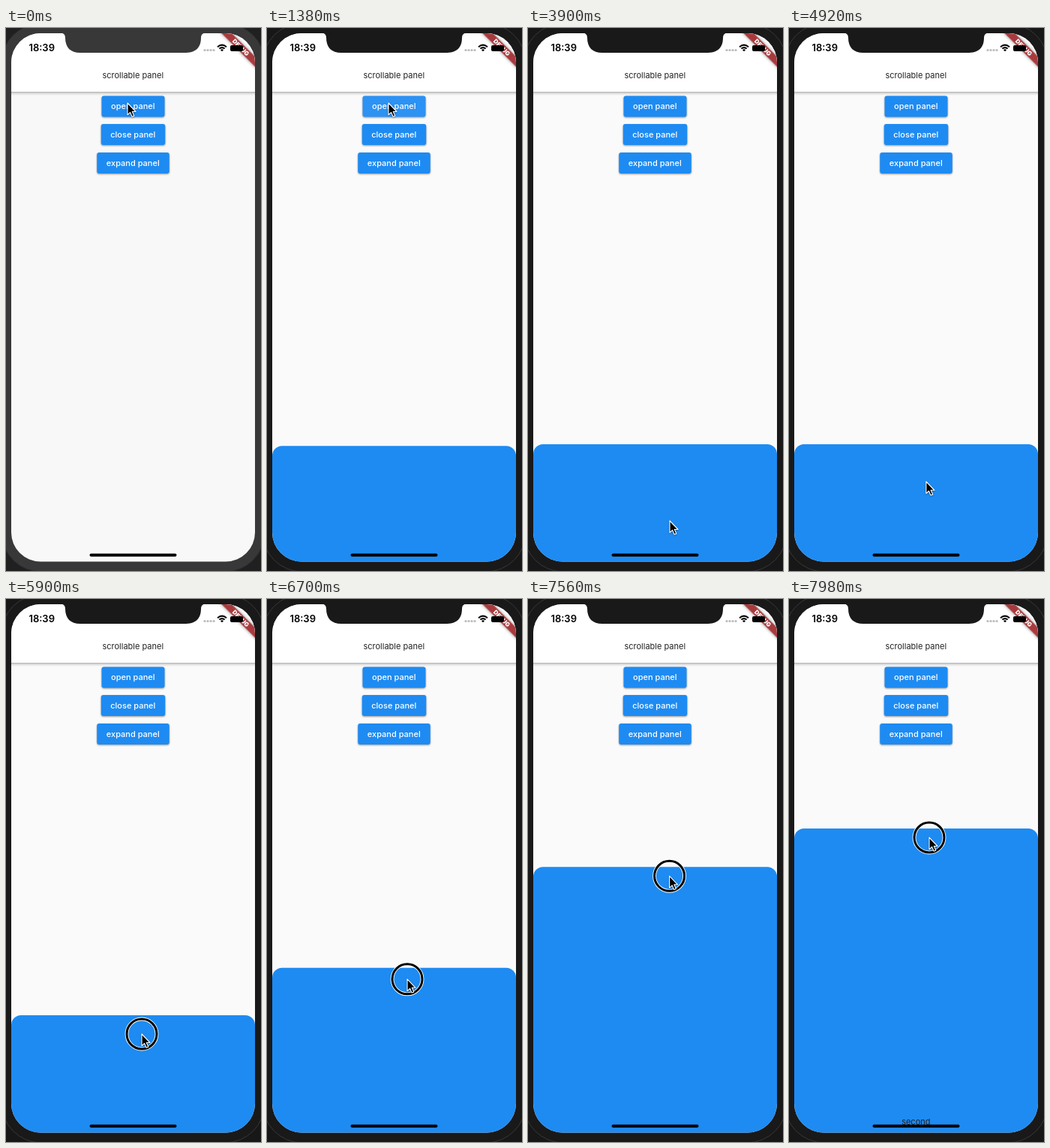
These frames come from a looping animation (340x724 px, 8 s). An HTML page:

```html
<!DOCTYPE html>
<html lang="en">
<head>
<meta charset="utf-8">
<title>Scrollable panel</title>
<style>
  html, body { margin: 0; width: 100%; height: 100%; overflow: hidden; background: #191919; }
  svg { display: block; width: 340px; height: 724px; }
  text { font: 11px Inter, "Open Sans", sans-serif; text-anchor: middle; fill: #222; }
  .button rect { fill: #1e8bf2; filter: drop-shadow(0 1.3px 1.3px #0006); }
  .button text { fill: #fff; font-weight: 500; }
  #clock { font-size: 13px; font-weight: 600; fill: #000; }
  #debug { font-size: 8px; font-weight: 900; fill: #fff; }
</style>
</head>
<body>
<svg viewBox="0 0 340 724">
  <defs>
    <clipPath id="screen"><rect x="7" y="7" width="325" height="704.5" rx="39"/></clipPath>
    <linearGradient id="barShadow" x2="0" y2="1">
      <stop stop-color="#000" stop-opacity=".3"/>
      <stop offset=".4" stop-color="#000" stop-opacity=".12"/>
      <stop offset="1" stop-color="#000" stop-opacity="0"/>
    </linearGradient>
  </defs>

  <rect id="outside" width="340" height="724"/>
  <rect id="bezel" x="-6" y="-6" width="351" height="731" rx="53"/>

  <g clip-path="url(#screen)">
    <rect id="page" x="7" y="7" width="325" height="705"/>
    <rect x="7" y="85" width="325" height="5" fill="url(#barShadow)"/>
    <rect x="7" y="7" width="325" height="78" fill="#fff"/>
    <text x="169.3" y="67">scrollable panel</text>
    <g id="buttons"></g>
    <rect id="ripple" x="127.5" y="90.5" width="84" height="28" rx="3" fill="#fff"/>

    <g id="panel">
      <rect x="7" width="325" height="740" rx="13" fill="#1e8bf2"/>
      <text x="169.3" y="394.5">second</text>
    </g>

    <g transform="translate(313.1 25.9) rotate(45)">
      <rect x="-36" y="-4.7" width="72" height="9.4" fill="#a83a3d" style="filter:drop-shadow(0 0 2px #0007)"/>
      <text id="debug" y="2.9">DEBUG</text>
    </g>

    <path d="M72 6 Q79 7 79 13 C79 26 86 33 99 33 H240 C253 33 260 26 260 13 Q260 7 267 6 Z" id="notch"/>
    <text id="clock" x="47.7" y="31">18:39</text>
    <g fill="#bbb">
      <circle cx="265" cy="29.5" r="1.6"/><circle cx="269" cy="29.5" r="1.6"/>
      <circle cx="273" cy="29.5" r="1.6"/><circle cx="277" cy="29.5" r="1.6"/>
    </g>
    <g fill="none" stroke="#000" stroke-width="2">
      <path d="M282 25.2 Q288 20 294 25.2"/>
      <path d="M284.4 27.6 Q288 24.6 291.6 27.6"/>
    </g>
    <path d="M286 29.2 Q288 27.5 290 29.2 L288 31.3 Z"/>
    <rect x="299" y="23" width="17" height="8" rx="2"/>
    <rect x="111.5" y="700.7" width="116" height="4" rx="2"/>
  </g>

  <g id="pointer">
    <g id="ring" fill="none">
      <circle r="20" stroke="#fff" stroke-width="4.8"/>
      <circle r="20" stroke="#000" stroke-width="3"/>
    </g>
    <path d="M0 0 V15.8 L3.6 12.5 L6.1 18.3 L8.8 17.2 L6.3 11.5 H11 Z"
          stroke="#fff" stroke-width="1.1" stroke-linejoin="round"
          style="filter:drop-shadow(0 1px .8px #0005)"/>
  </g>
</svg>
<script>
const LOOP = 8000, FOCUS = 860;
const $ = id => document.getElementById(id);

// [time, x, y] of the pointer tip
const pointerSteps = [
  [2700, 162, 100], [3260, 178, 182], [3500, 193, 400], [3780, 191, 645],
  [3900, 189, 657], [4460, 189, 657], [5060, 181, 589], [5320, 181, 588],
  [5600, 181, 580], [5920, 181, 580], [6300, 183, 556], [6700, 187, 507],
  [7160, 189, 417], [7440, 189, 384], [7720, 188, 350], [7980, 187, 318]
];
// [time, top edge] while the panel is dragged
const dragSteps = [
  [5980, 555], [6300, 540], [6700, 492], [7160, 404],
  [7440, 372], [7720, 338], [7980, 306]
];
const presses = [[860, 1040], [5400, LOOP]];

const clamp = v => Math.min(1, Math.max(0, v));
const easeOut = p => 1 - (1 - p) ** 3;

function at(steps, t) {
  const i = steps.findIndex(s => s[0] > t);
  if (i === 0) return steps[0].slice(1);
  if (i < 0) return steps[steps.length - 1].slice(1);
  const [a, b] = [steps[i - 1], steps[i]];
  const p = (t - a[0]) / (b[0] - a[0]);
  return a.slice(1).map((v, k) => v + (b[k + 1] - v) * p);
}

function panelTop(t) {
  if (t >= dragSteps[0][0]) return at(dragSteps, t)[0];
  return 713 - 158 * easeOut(clamp((t - 1040) / 450));
}

$("buttons").innerHTML = [["open", 84, 90.5], ["close", 85.5, 128], ["expand", 96.5, 166]]
  .map(([name, w, y]) => `<g class="button">
    <rect x="${169.5 - w / 2}" y="${y}" width="${w}" height="28" rx="3"/>
    <text x="169.3" y="${y + 17.5}">${name} panel</text></g>`).join("");

function draw(t) {
  const focused = t >= FOCUS;
  $("outside").setAttribute("fill", focused ? "#171717" : "#202020");
  $("bezel").setAttribute("fill", focused ? "#191919" : "#383838");
  $("bezel").setAttribute("stroke", focused ? "#383838" : "#2c2c2c");
  $("notch").setAttribute("fill", focused ? "#191919" : "#383838");
  $("page").setAttribute("fill", focused ? "#fafafa" : "#f8f8f8");

  const glow = t < 1040 ? clamp((t - FOCUS) / 120) : 1 - clamp((t - 1040) / 500);
  $("ripple").setAttribute("opacity", 0.2 * glow);
  $("panel").setAttribute("transform", `translate(0 ${panelTop(t)})`);
  $("pointer").setAttribute("transform", `translate(${at(pointerSteps, t)})`);
  $("ring").setAttribute("visibility", presses.some(([a, b]) => t >= a && t < b) ? "visible" : "hidden");
}

const start = performance.now();
function tick() {
  draw((performance.now() - start) % LOOP);
  requestAnimationFrame(tick);
}
tick();
</script>
</body>
</html>
```
